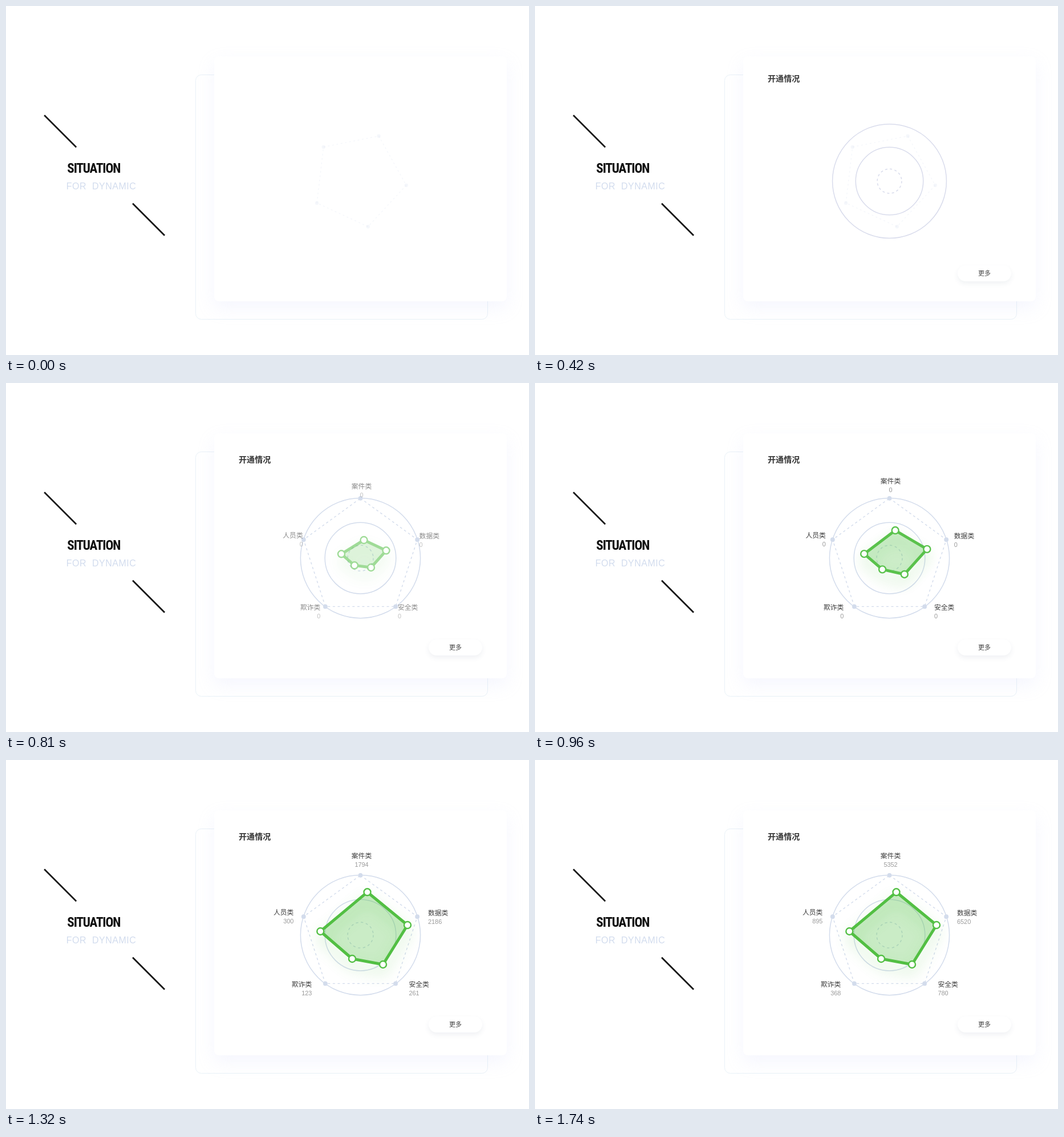
Recreate the animation shown at these times as an HTML page with a canvas. Size 917 by 611 pixels, loop 2700 ms.

```html
<!DOCTYPE html>
<html lang="zh-CN">
<head>
<meta charset="utf-8">
<title>Situation</title>
<style>
html, body { margin: 0; width: 100%; height: 100%; overflow: hidden; background: #fff; }
canvas, svg { position: absolute; left: 0; top: 0; display: block; }
#head { letter-spacing: -.05em; fill: #111; }
</style>
</head>
<body>
<canvas id="stage" width="917" height="611"></canvas>
<svg width="917" height="611"><text id="head" x="107.3" y="291.5">SITUATION</text></svg>
<script>
const W = 917, H = 611, LOOP = 2700;
const CX = 621.5, CY = 306.6;
const CJK = '"Noto Sans CJK SC", "Noto Sans CJK", sans-serif';
const LATIN = '"Liberation Sans", Arial, sans-serif';
const GREEN = '#52bf43', BLUE = '#d3dcec';

const ctx = document.getElementById('stage').getContext('2d');
const layer = document.createElement('canvas');
layer.width = W;
layer.height = H;
const lctx = layer.getContext('2d');

const labels = [
  { name: '案件类', total: 5352, x: 623.5, y: 171.6, align: 'center', dx: 0, dy: 19 },
  { name: '数据类', total: 6520, x: 740, y: 272.2, align: 'left', dx: -22.5, dy: 0 },
  { name: '安全类', total: 780, x: 706.5, y: 397.4, align: 'left', dx: -28.5, dy: 0 },
  { name: '欺诈类', total: 368, x: 536.3, y: 397.4, align: 'right', dx: 22, dy: 0 },
  { name: '人员类', total: 895, x: 504.3, y: 271.4, align: 'right', dx: 24, dy: 0 }
];

// Radar shape at each key time, clockwise from the top
const keyTimes = [660, 810, 1080, 1280];
const keyShapes = [
  [[623, 289], [642, 296], [631, 317], [613, 314], [601, 299]],
  [[627.5, 275], [666.5, 293.3], [640, 323], [611, 319.3], [588, 299.3]],
  [[635, 244.5], [704, 289], [654, 344.5], [607.5, 332], [568.5, 299]],
  [[633.5, 231.3], [704, 289], [661, 358], [607, 348], [551.3, 300]]
];

const clamp = v => Math.max(0, Math.min(1, v));
const span = (t, from, to) => clamp((t - from) / (to - from));
const smooth = u => u * u * (3 - 2 * u);
const sine = u => (1 - Math.cos(Math.PI * u)) / 2;
const quad = u => u < .5 ? 2 * u * u : 1 - 2 * (1 - u) * (1 - u);

// The picture steps every 30 ms, with one double-length step per 180 ms
function stepTime(ms) {
  const t = Math.floor((ms % LOOP) / 30) * 30;
  return t % 180 === 30 ? t - 30 : t;
}

function text(str, x, y, font, color, align = 'left', spacing = 0) {
  ctx.font = font;
  ctx.fillStyle = color;
  ctx.textAlign = align;
  ctx.letterSpacing = spacing + 'px';
  ctx.fillText(str, x, y);
}

function line(x1, y1, x2, y2) {
  ctx.beginPath();
  ctx.moveTo(x1, y1);
  ctx.lineTo(x2, y2);
  ctx.stroke();
}

function box(x, y, w, h, r) {
  ctx.beginPath();
  ctx.roundRect(x, y, w, h, r);
}

function raised(x, y, w, h, r, color, blur, drop) {
  ctx.save();
  ctx.shadowColor = color;
  ctx.shadowBlur = blur;
  ctx.shadowOffsetY = drop;
  ctx.fillStyle = '#fff';
  box(x, y, w, h, r);
  ctx.fill();
  ctx.restore();
}

function ring(c, x, y, r) {
  c.beginPath();
  c.arc(x, y, r, 0, 2 * Math.PI);
}

function trace(c, pts) {
  c.beginPath();
  pts.forEach(p => c.lineTo(p[0], p[1]));
  c.closePath();
}

function backdrop() {
  ctx.fillStyle = '#fff';
  ctx.fillRect(0, 0, W, H);
  ctx.strokeStyle = '#111';
  ctx.lineWidth = 2.7;
  line(67.2, 191.2, 123.2, 247.2);
  line(222.1, 345.8, 278.1, 401.8);
  text('FOR\u00a0\u00a0DYNAMIC', 105.8, 321.4, '16px ' + LATIN, '#d2dcee', 'left', .5);
  ctx.strokeStyle = '#e9f1f7';
  ctx.lineWidth = 1;
  box(332.5, 120.5, 512, 428, 10);
  ctx.stroke();
  raised(365, 88, 513, 429, 8, 'rgba(196,202,248,.17)', 30, 12);
}

function intro(t) {
  const p = smooth(span(t, 90, 690)), left = 1 - p;
  ctx.save();
  ctx.globalAlpha = t < 90 ? 0 : span(t, 60, 430);
  text('开通情况', 408, 139.4 - 18 * left, '600 14.1px ' + CJK, '#333');

  const by = 449 + 12 * left;
  raised(741, by, 94, 28, 14, 'rgba(60,80,110,.08)', 9, 4);
  text('更多', 788, by + 18, '11px ' + CJK, '#444', 'center');

  const s = 1 - .115 * left;
  ctx.strokeStyle = `rgb(${222 - 11 * p},220,236)`;
  ctx.lineWidth = 1.5;
  for (const r of [105.1, 62.3]) {
    ring(ctx, CX, CY, r * s);
    ctx.stroke();
  }
  ctx.setLineDash([4.2 * s, 4.636 * s]);
  ring(ctx, CX, CY, 22.5 * s);
  ctx.stroke();
  ctx.restore();
}

function pentagon(t) {
  const p = sine(span(t, 480, 780)), q = 1 - p;
  const x = CX - 3.1 * q, y = CY - 2.7 * q, r = 104.8 - 20.8 * q;
  const pts = labels.map((_, i) => {
    const a = (i * 72 + 24.8 * q) * Math.PI / 180;
    return [x + r * Math.sin(a), y - r * Math.cos(a)];
  });
  ctx.save();
  ctx.globalAlpha = .22 + .78 * p;
  ctx.strokeStyle = ctx.fillStyle = BLUE;
  ctx.lineWidth = 1.4;
  ctx.setLineDash([4 - q, 4.6]);
  trace(ctx, pts);
  ctx.stroke();
  for (const [px, py] of pts) {
    ring(ctx, px, py, 3.9 - .7 * q);
    ctx.fill();
  }
  ctx.restore();
}

function shapeAt(t) {
  let k = 0;
  while (k < 2 && t >= keyTimes[k + 1]) k++;
  const u = Math.min(1, (t - keyTimes[k]) / (keyTimes[k + 1] - keyTimes[k]));
  return keyShapes[k].map((a, i) => a.map((v, j) => v + (keyShapes[k + 1][i][j] - v) * u));
}

function radar(t) {
  const alpha = span(t, 604, 979);
  if (!alpha) return;
  const pts = shapeAt(t), c = lctx;
  c.clearRect(0, 0, W, H);
  trace(c, pts);
  c.fillStyle = 'rgba(82,191,67,.3)';
  c.fill();
  c.save();
  c.shadowColor = 'rgba(82,191,67,.42)';
  c.shadowBlur = 24;
  c.shadowOffsetY = 13;
  c.strokeStyle = GREEN;
  c.lineWidth = 5;
  c.lineJoin = 'round';
  c.stroke();
  c.restore();
  c.fillStyle = '#fff';
  c.strokeStyle = GREEN;
  c.lineWidth = 2.4;
  for (const [x, y] of pts) {
    ring(c, x, y, 6);
    c.fill();
    c.stroke();
  }
  ctx.globalAlpha = alpha;
  ctx.drawImage(layer, 0, 0);
  ctx.globalAlpha = 1;
}

function captions(t) {
  const alpha = span(t, 630, 930);
  if (!alpha) return;
  const left = 1 - smooth(span(t, 630, 1110));
  const count = t >= 1740 ? 1 : quad(span(t, 1015, 1760));
  ctx.globalAlpha = alpha;
  for (const l of labels) {
    const x = l.x + l.dx * left, y = l.y + l.dy * left;
    text(l.name, x, y, '11.8px ' + CJK, '#3c3c3c', l.align);
    text(Math.round(l.total * count), x, y + 15, '10.9px ' + LATIN, '#999', l.align);
  }
  ctx.globalAlpha = 1;
}

// Use the narrowest installed face for the heading
function setHeading() {
  const head = document.getElementById('head');
  const faces = ['Noto Sans', 'Open Sans', 'Roboto Condensed', 'Roboto', 'Lato'];
  const size = 27.5, room = 93;
  const widths = faces.map(f => {
    head.style.font = `600 ${size}px "${f}", sans-serif`;
    head.style.fontStretch = 'extra-condensed';
    return head.getComputedTextLength();
  });
  const w = Math.min(...widths);
  head.style.fontFamily = `"${faces[widths.indexOf(w)]}", sans-serif`;
  head.style.fontSize = Math.min(size, size * room / w) + 'px';
}

function draw(ms) {
  const t = stepTime(ms);
  backdrop();
  intro(t);
  pentagon(t);
  radar(t);
  captions(t);
}

setHeading();
const start = performance.now();
function tick() {
  draw(performance.now() - start);
  requestAnimationFrame(tick);
}
tick();
</script>
</body>
</html>
```
